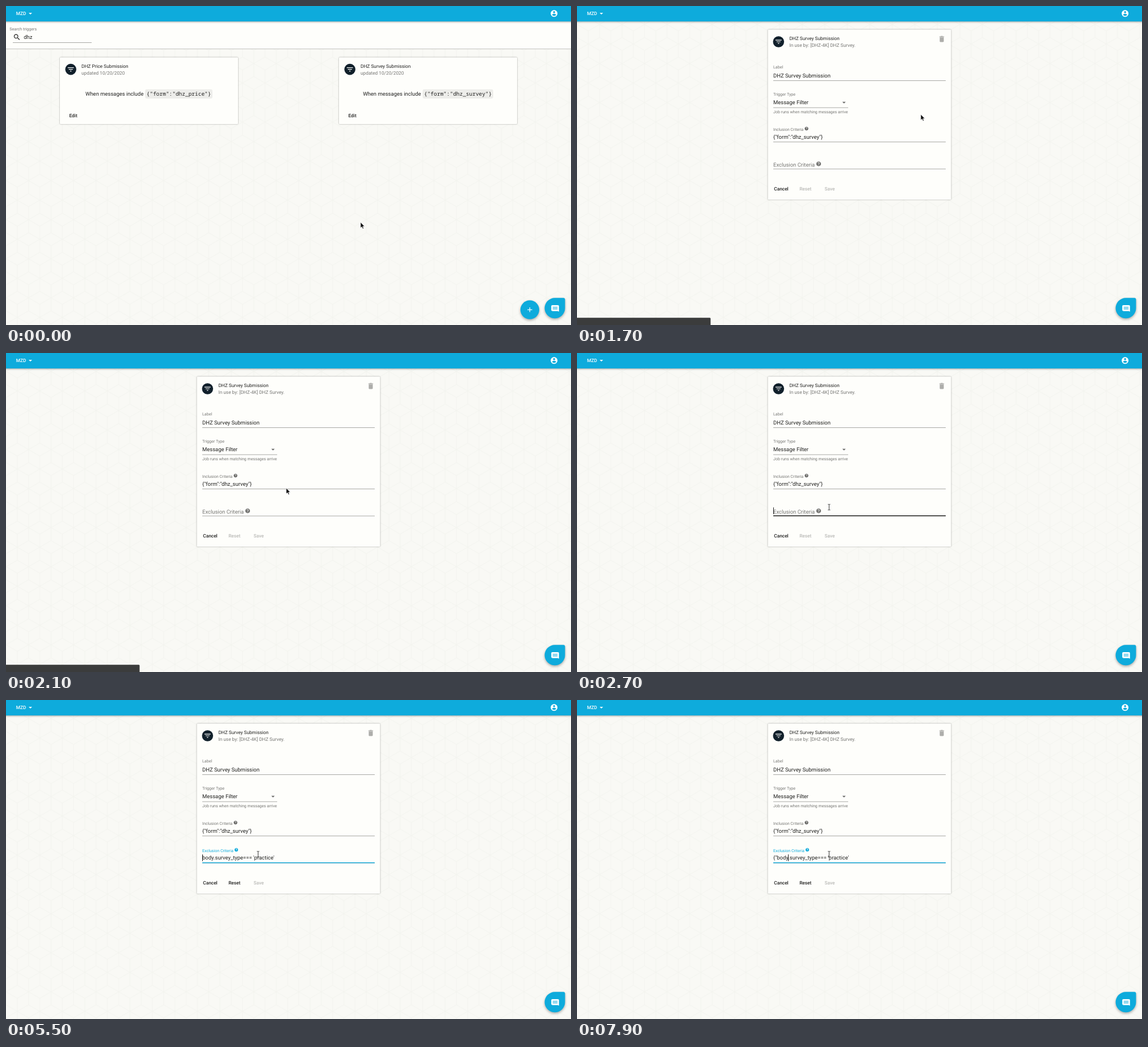
These frames come from a looping animation (996x562 px, 8000 ms). An HTML page:

```html
<!DOCTYPE html>
<html lang="en">
<head>
<meta charset="utf-8">
<title>Trigger editor</title>
<style>
html, body { margin: 0; width: 100%; height: 100%; overflow: hidden; background: #f9f9f5; }
svg { display: block; width: 996px; height: 562px; }
text { font-family: Roboto, sans-serif; text-rendering: geometricPrecision; white-space: pre; fill: #212120; }
.card { fill: #fefefb; filter: drop-shadow(0 .7px .8px rgba(0,0,0,.38)); }
.bar { filter: drop-shadow(0 1px 1.5px rgba(0,0,0,.35)); }
.fab { fill: #0eabdc; filter: drop-shadow(0 2px 2px rgba(0,0,0,.32)); }
.code { font-family: "Noto Sans Mono", "DejaVu Sans Mono", monospace; }
</style>
</head>
<body>
<svg id="stage" viewBox="0 0 996 562"></svg>
<script>
const BLUE = '#0eabdc', INK = '#212120', GRAY = '#767674', FAINT = '#b9b9b6', NAVY = '#11202b';
const BIG = 9.486, MID = 8.3, SMALL = 7.114, ICON = 0.593;

const DISC = 'M12 2C6.48 2 2 6.48 2 12s4.48 10 10 10 10-4.48 10-10S17.52 2 12 2z';
const icons = {
  filter: 'M10 18h4v-2h-4v2zM3 6v2h18V6H3zm3 7h12v-2H6v2z',
  account: DISC + 'm0 3c1.66 0 3 1.34 3 3s-1.34 3-3 3-3-1.34-3-3 1.34-3 3-3zm0 14.2c-2.5 0-4.71-1.28-6-3.22.03-1.99 4-3.08 6-3.08 1.99 0 5.97 1.09 6 3.08-1.29 1.94-3.5 3.22-6 3.22z',
  help: DISC + 'm1 17h-2v-2h2v2zm2.07-7.75l-.9.92C13.45 12.9 13 13.5 13 15h-2v-.5c0-1.1.45-2.1 1.17-2.83l1.24-1.26c.37-.36.59-.86.59-1.41 0-1.1-.9-2-2-2s-2 .9-2 2H8c0-2.21 1.79-4 4-4s4 1.79 4 4c0 .88-.36 1.68-.93 2.25z',
  trash: 'M6 19c0 1.1.9 2 2 2h8c1.1 0 2-.9 2-2V7H6v12zM19 4h-3.5l-1-1h-5l-1 1H5v2h14V4z',
  search: 'M15.5 14h-.79l-.28-.27C15.41 12.59 16 11.11 16 9.5 16 5.91 13.09 3 9.5 3S3 5.91 3 9.5 5.91 16 9.5 16c1.61 0 3.09-.59 4.23-1.57l.27.28v.79l5 4.99L20.49 19l-4.99-5zm-6 0C7.01 14 5 11.99 5 9.5S7.01 5 9.5 5 14 7.01 14 9.5 11.99 14 9.5 14z',
  down: 'M7 10l5 5 5-5z',
  plus: 'M19 13h-6v6h-2v-6H5v-2h6V5h2v6h6v2z'
};

const text = (x, y, size, str, fill = INK, extra = '') =>
  `<text x="${x}" y="${y}" font-size="${size}" style="fill:${fill}" ${extra}>${str}</text>`;
const bold = (x, y, str, fill = INK, id = '') =>
  text(x, y, MID, str, fill, `font-weight="500" id="${id}"`);
const icon = (name, x, y, fill, scale = ICON) =>
  `<path d="${icons[name]}" fill="${fill}" transform="translate(${x} ${y}) scale(${scale}) translate(-12 -12)"/>`;
const rect = (x, y, w, h, fill, extra = '') =>
  `<rect x="${x}" y="${y}" width="${w}" height="${h}" fill="${fill}" ${extra}/>`;
const rule = (x, y, w) => rect(x, y - .3, w, .75, '#8b8b89');
const badge = (x, y) => `<circle cx="${x}" cy="${y}" r="9.8" fill="${NAVY}"/>` + icon('filter', x, y, '#fff');

const listCard = (x, title, textX, code) =>
  rect(x, 90.5, 314, 117.5, '', 'class="card" rx="1.5"') +
  badge(x + 19.2, 111.6) +
  text(x + 38, 108.5, MID, title) +
  text(x + 38, 120.6, MID, 'updated 10/20/2020', GRAY) +
  text(textX, 158, BIG, 'When messages include') +
  rect(textX + 105.3, 146.7, code.length * 5.69 + 4.8, 16.2, '#ededea', 'rx="3"') +
  text(textX + 107.8, 158, BIG, code, INK, 'class="code"') +
  bold(x + 16.5, 195.5, 'Edit');

const list =
  rect(0, 27, 996, 48.5, '#fefefb') + rect(0, 75.2, 996, .9, '#bcbcba') +
  text(6.3, 43, SMALL, 'Search triggers', GRAY) +
  icon('search', 19.2, 54.9, INK) + text(31.2, 58.4, BIG, 'dhz') + rule(12, 64.5, 139) +
  listCard(95, 'DHZ Price Submission', 140, '{"form":"dhz_price"}') +
  listCard(587, 'DHZ Survey Submission', 629.2, '{"form":"dhz_survey"}') +
  rect(597, 184, 27, 17, '#000', 'id="ripple" rx="2" opacity=".1"') +
  '<circle class="fab" cx="923.4" cy="535.2" r="16.6"/>' + icon('plus', 923.4, 535.2, '#fff');

const form =
  rect(336.5, 41.5, 323, 299.5, '', 'class="card" rx="1.5"') +
  badge(355.3, 63) +
  text(374.4, 60, MID, 'DHZ Survey Submission') +
  text(374.4, 72.1, MID, 'In use by: [DHZ-4K] DHZ Survey.', GRAY) +
  icon('trash', 643, 58.2, '#adadaa') +
  text(346, 110, SMALL, 'Label', GRAY) +
  text(346, 125.5, BIG, 'DHZ Survey Submission') + rule(346, 131.3, 304) +
  text(346, 157.6, SMALL, 'Trigger Type', GRAY) +
  text(346, 173, BIG, 'Message Filter') + icon('down', 470.7, 170, '#6b6b69') + rule(346, 179, 132) +
  text(346, 189, SMALL, 'Job runs when matching messages arrive', GRAY) +
  text(346, 219.8, SMALL, 'Inclusion Criteria', GRAY) + icon('help', 404.6, 216, '#666664', .32) +
  text(346, 233.6, BIG, '{"form":"dhz_survey"}') + rule(346, 239.4, 304) +
  rule(346, 287, 304) + rect(346, 286, 304, 1.4, INK, 'id="hover"') +
  rect(-152, 286, 304, 1.4, BLUE, 'id="focus"') +
  `<g id="label">${text(0, 0, BIG, 'Exclusion Criteria', 'inherit')}${icon('help', 80, -4.9, 'currentColor', .42)}</g>` +
  text(346, 281.2, BIG, '', INK, 'id="entry"') +
  rect(346, 272, 1, 12, INK, 'id="caret"') +
  bold(347.3, 325, 'Cancel') + bold(392.2, 325, 'Reset', FAINT, 'reset') + bold(436.6, 325, 'Save', FAINT);

const cursors = {
  arrow: '<path d="M0 0V10L2.3 7.9 3.9 11.4 5.5 10.7 4 7.3H7Z" fill="#111" stroke="#fff" stroke-width=".6"/>',
  hand: '<path d="M-.6 .9Q.4-.3 1.3 .9V4.4L4.8 5Q6 5.3 5.9 6.5L5.3 9.2V10.8H-.6V9.6L-3.6 6.6Q-3.8 5.4-2.5 5.5L-.6 6.9Z" fill="#fff" stroke="#111" stroke-width=".9"/>',
  beam: '<path d="M-2-5H-.5L0-4.5 .5-5H2M0-4.5V4.5M-2 5H-.5L0 4.5 .5 5H2" fill="none" stroke="#222" stroke-width=".9"/>'
};

const stage = document.getElementById('stage');
stage.innerHTML = `
  <pattern id="cubes" width="39.7" height="68.8" y="21" patternUnits="userSpaceOnUse" viewBox="0 0 40 69" preserveAspectRatio="none">
    <path d="M20 0L40 11.5V34.5L20 46 0 34.5V11.5ZM20 23V69M0 11.5L20 23 40 11.5M0 57.5L20 46 40 57.5M0 0V11.5M0 57.5V69M40 0V11.5M40 57.5V69" fill="none" stroke="#f2f3ee"/>
  </pattern>
  ${rect(0, 0, 996, 562, '#f9f9f5')}${rect(0, 0, 996, 562, 'url(#cubes)')}
  <g id="list">${list}</g><g id="form">${form}</g>
  ${rect(-5, -5, 1006, 32.2, BLUE, 'class="bar"')}
  ${bold(17.8, 16, 'MZD', '#fff')}${icon('down', 43, 13.2, '#fff')}${icon('account', 966.2, 13.2, '#fff')}
  <path class="fab" d="M967.5 514.3H982.5Q985.5 514.3 985.5 517.3V532.2A18 18 0 1 1 967.5 514.3Z"/>
  <path d="M963 527H973Q974.8 527 974.8 528.8V538.6L972.6 537.4H963Q961.2 537.4 961.2 535.6V528.8Q961.2 527 963 527Z" fill="#fff"/>
  ${rect(963.8, 530.2, 8.4, 1.2, BLUE)}${rect(963.8, 533, 8.4, 1.2, BLUE)}
  ${rect(-3, 549.3, 238.5, 16, '#3b3c3c', 'id="status" rx="1.5"')}
  <g id="pointer"></g>`;

const el = {};
stage.querySelectorAll('[id]').forEach(node => el[node.id] = node);
const show = (node, on) => node.style.display = on ? '' : 'none';

// time, x, y of the pointer
const path = [
  [0, 625, 381], [400, 625, 381], [500, 622, 369], [600, 612, 322], [700, 599, 262], [800, 590, 218],
  [900, 598, 200], [1000, 606, 191], [1800, 606, 191], [1900, 590, 197], [2000, 545, 215],
  [2100, 494, 238], [2200, 460, 254], [2300, 447, 263], [2400, 445, 269], [2500, 444.4, 271.6], [8000, 444.4, 271.6]
];
// time, typed text, caret position (0 while the caret is off)
const BODY = "body.survey_type=== 'practice'";
const edits = [
  [0, '', 0], [2700, '', 346], [3300, '', 0], [3900, BODY, 473], [4300, BODY, 346], [4900, BODY, 0],
  [5500, BODY, 346], [6100, BODY, 0], [6600, '{' + BODY, 349], [7300, '{"' + BODY, 352],
  [7600, '{"' + BODY, 0], [7900, '{"' + BODY, 372]
];

function pointerAt(t) {
  const i = path.findIndex(p => p[0] > t);
  const [t0, x0, y0] = path[i - 1], [t1, x1, y1] = path[i];
  const k = (t - t0) / (t1 - t0);
  return [x0 + (x1 - x0) * k, y0 + (y1 - y0) * k];
}

function draw(t) {
  const editing = t >= 1600;
  show(el.list, !editing);
  show(el.form, editing);
  show(el.ripple, t >= 1500);
  show(el.status, t >= 1600 && t < 2200);

  const [x, y] = pointerAt(t);
  const kind = t >= 2300 ? 'beam' : t >= 1000 && !editing ? 'hand' : 'arrow';
  el.pointer.innerHTML = cursors[kind];
  el.pointer.setAttribute('transform', `translate(${x} ${y})`);

  const float = t < 2800 ? 0 : t < 2900 ? .6 : 1;
  const grow = t < 2800 ? 0 : t < 2900 ? .7 : t < 3100 ? .987 : 1;
  el.label.setAttribute('transform', `translate(346 ${283 - 15.4 * float}) scale(${1 - .25 * float})`);
  el.label.style.color = el.label.style.fill = float ? BLUE : GRAY;
  show(el.hover, t >= 2400 && t < 2900);
  el.focus.setAttribute('transform', `translate(498 0) scale(${grow} 1)`);

  const [, typed, caret] = edits.findLast(e => e[0] <= t);
  el.entry.textContent = typed;
  el.caret.setAttribute('x', caret);
  show(el.caret, caret);
  el.reset.style.fill = typed ? INK : FAINT;
}

function tick() {
  draw(Math.floor(performance.now() % 8000 / 100) * 100);
  requestAnimationFrame(tick);
}
tick();
</script>
</body>
</html>
```
